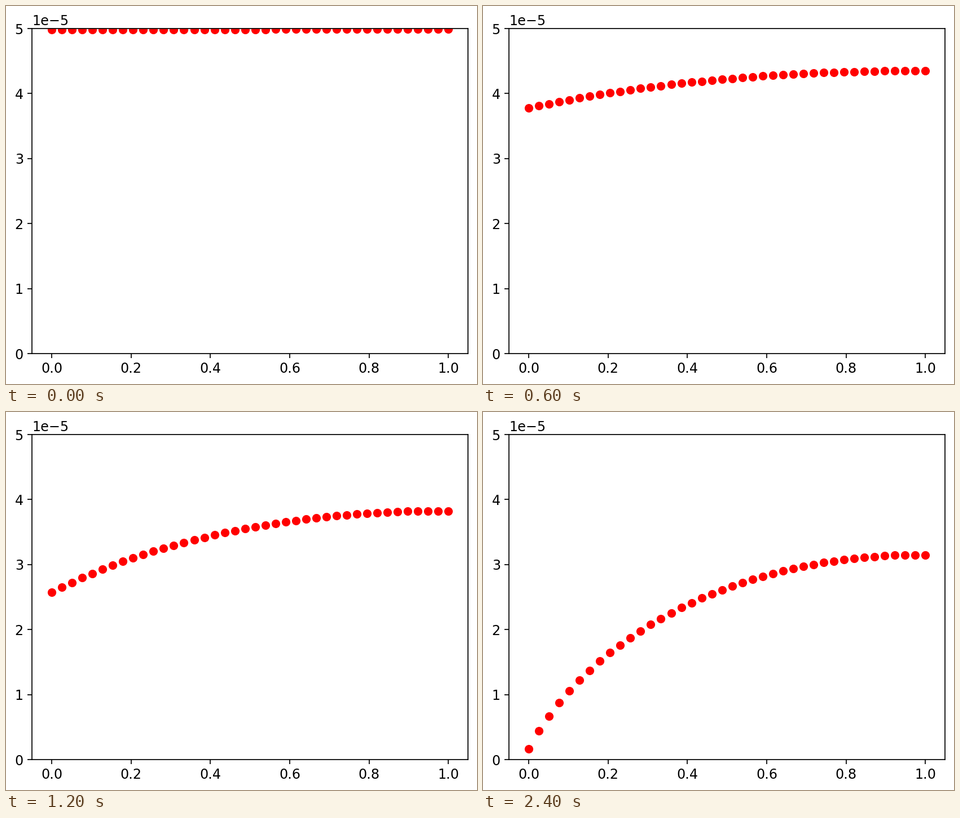
Recreate the animation shown at these times as a matplotlib script. Size 835 by 671 pixels, loop 2.5 s.

```python
import numpy as np
import matplotlib.pyplot as plt
from matplotlib.animation import FuncAnimation

W, H, DPI = 835, 671, 156
FRAMES, INTERVAL, SUBSTEPS = 25, 100, 10

# Pore closing by deposition: Knudsen diffusion along x, first-order wall reaction.
N = 40
R0 = 5e-5          # initial radius
SINK = 34.1e-10    # reaction / diffusion ratio, times radius squared
GROWTH = 2.008e-7  # deposit per step at the pore mouth

x = np.linspace(0, 1, N)
dx = x[1] - x[0]


def concentration(r):
    """Solve C'' = SINK * C / r^2 with C(0) = 1 and no flux at the closed end."""
    a = np.diag(-2 - SINK * dx**2 / r**2)
    a += np.eye(N, k=1) + np.eye(N, k=-1)
    a[0] = a[-1] = 0
    a[0, 0] = a[-1, -1] = 1
    a[-1, -2] = -1
    b = np.zeros(N)
    b[0] = 1
    return np.linalg.solve(a, b)


def simulate():
    r = np.full(N, R0)
    shots = []
    for step in range((FRAMES - 1) * SUBSTEPS + 1):
        r = r - GROWTH * concentration(r)
        if step % SUBSTEPS == 0:
            shots.append(r)
    return shots


profiles = simulate()

plt.rcParams.update({"font.family": "DejaVu Sans", "font.size": 11})
fig = plt.figure(figsize=((W + 0.001) / DPI, (H + 0.001) / DPI), dpi=DPI,
                 facecolor="white")
ax = fig.add_axes([46 / W, 54 / H, 773.3 / W, 577 / H])
ax.set_xlim(-0.05, 1.05)
ax.set_ylim(0, R0)
dots, = ax.plot(x, profiles[0], "ro")


def update(i):
    dots.set_ydata(profiles[i])
    return dots,


anim = FuncAnimation(fig, update, frames=FRAMES, interval=INTERVAL,
                     repeat=True, repeat_delay=0, blit=False)
plt.show()
```
